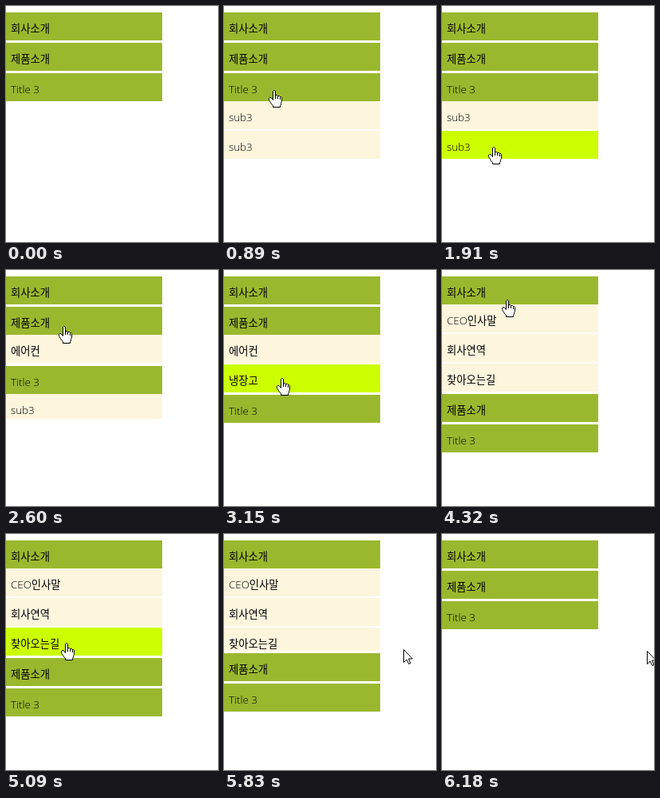
Recreate the animation shown at these times as an HTML page with a canvas. Size 266 by 295 pixels, loop 6.44 s.

```html
<!DOCTYPE html>
<html lang="ko">
<head>
<meta charset="utf-8">
<style>
  html, body { margin: 0; height: 100%; overflow: hidden; background: #fff; }
  canvas { display: block; }
</style>
</head>
<body>
<canvas id="stage" width="266" height="295"></canvas>
<script>
const ctx = document.getElementById('stage').getContext('2d');
const LOOP = 6440, STEP = 68.7, PHASE = 53, SLIDE = 400;
const WIDTH = 196, ROW = 35, SUB_PITCH = 37, GAP = 3, TOP = 8;

const menus = [
  { title: '회사소개', subs: ['CEO인사말', '회사연역', '찾아오는길'], open: 3840, close: 5765 },
  { title: '제품소개', subs: ['에어컨', '냉장고'], open: 2395, close: 3822 },
  { title: 'Title 3', subs: ['sub3', 'sub3'], open: 485, close: 2377 }
];

// Each move brings the pointer hotspot to x, y
const entry = { x: 238, y: 278, time: 180 };
const moves = [
  { from: 200, to: 620, x: 62, y: 105 },
  { from: 1480, to: 1860, x: 64, y: 176 },
  { from: 1980, to: 2250, x: 70, y: 85 },
  { from: 2340, to: 2460, x: 72, y: 70 },
  { from: 2740, to: 3220, x: 72, y: 137 },
  { from: 3360, to: 3620, x: 77, y: 79 },
  { from: 3700, to: 4000, x: 81, y: 32 },
  { from: 4110, to: 4300, x: 81, y: 37 },
  { from: 4400, to: 5060, x: 75, y: 136 },
  { from: 5540, to: 6030, x: 257, y: 146 }
];

const hand = new Path2D('M-.5 1.5L.5 .5H1.5L2.5 1.5V6.5H4.5L5.5 7.5H7.5L8.5 8.5H9.5L10.5 9.5V14.5' +
  'L9.5 16.5V18L8.5 19.5V21.5H-.5V19.5L-2.5 17.5L-3.5 15.5L-5.5 12.5V10.5L-4.5 9.5H-3L-1.5 11.5L-.5 12.5Z');
const fingers = new Path2D('M-.5 12V2M2.5 6V11M5.5 7.5V11M8.5 8.5V12');
const arrow = new Path2D('M.5 .5V16.5L4.2 13L6.8 18.5L9 17.5L6.5 12H11.5Z');

const clamp = v => Math.min(1, Math.max(0, v));
const swing = p => 0.5 - Math.cos(clamp(p) * Math.PI) / 2;
const easeOut = p => 1 - (1 - clamp(p)) ** 2;

function pointerAt(t) {
  if (t < entry.time) return null;
  let { x, y } = entry;
  for (const m of moves) {
    const p = easeOut((t - m.from) / (m.to - m.from));
    x += (m.x - x) * p;
    y += (m.y - y) * p;
  }
  return { x: Math.round(x), y: Math.round(y) };
}

function drawRow(label, y, color) {
  ctx.fillStyle = color;
  ctx.fillRect(0, y, WIDTH, ROW);
  ctx.fillStyle = '#000';
  ctx.fillText(label, 6, y + 25);
}

function drawPanel(subs, y, height, pointer) {
  ctx.save();
  ctx.beginPath();
  ctx.rect(0, y, WIDTH, height);
  ctx.clip();
  subs.forEach((label, i) => {
    const top = y + i * SUB_PITCH;
    const bottom = Math.min(top + ROW, y + height);
    const over = pointer && pointer.x < WIDTH && pointer.y >= top && pointer.y < bottom;
    drawRow(label, top, over ? '#ccff00' : '#fef5dd');
  });
  ctx.restore();
}

function drawPointer({ x, y }, menuBottom) {
  const onMenu = x < WIDTH && y < menuBottom;
  const shape = onMenu ? hand : arrow;
  ctx.save();
  ctx.translate(x, y);
  ctx.fillStyle = '#fff';
  ctx.strokeStyle = '#000';
  ctx.fill(shape);
  ctx.stroke(shape);
  if (onMenu) ctx.stroke(fingers);
  ctx.restore();
}

function draw(time) {
  // The picture advances in even steps
  const t = PHASE + Math.floor((time - PHASE) / STEP) * STEP;
  const pointer = pointerAt(t);

  ctx.fillStyle = '#fff';
  ctx.fillRect(0, 0, 266, 295);
  ctx.font = '300 13.33px "Open Sans", "Noto Sans CJK KR", "Noto Sans CJK", sans-serif';

  let y = TOP;
  for (const { title, subs, open, close } of menus) {
    const full = subs.length * SUB_PITCH - 2;
    const height = Math.round(full * (swing((t - open) / SLIDE) - swing((t - close) / SLIDE)));
    drawRow(title, y, '#9ab82e');
    if (height > 0) drawPanel(subs, y + ROW, height, pointer);
    y += ROW + height + GAP;
  }
  if (pointer) drawPointer(pointer, y - GAP);
}

const begin = performance.now();
function tick() {
  draw((performance.now() - begin) % LOOP);
  requestAnimationFrame(tick);
}
tick();
</script>
</body>
</html>
```
